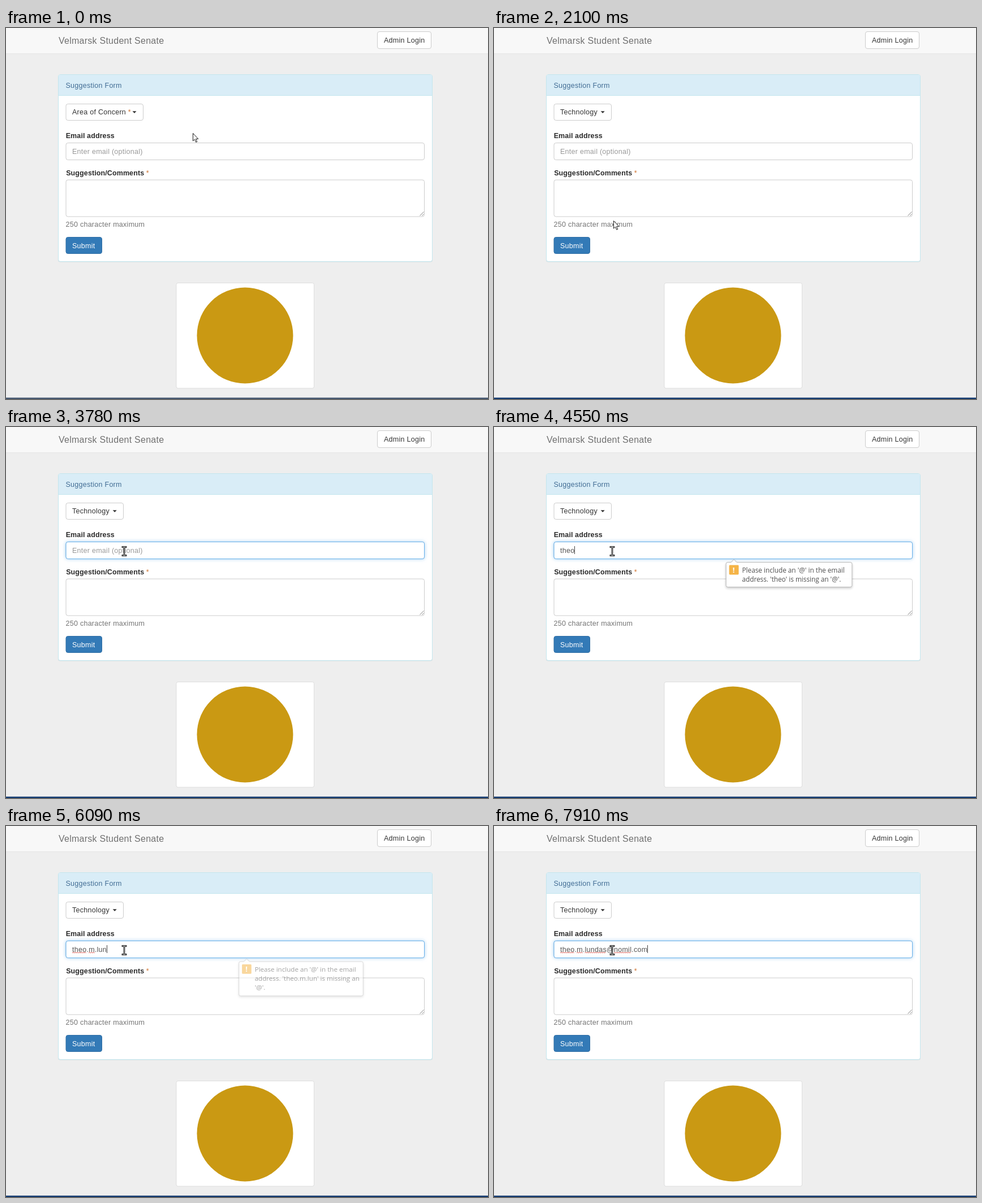
These frames come from a looping animation (852x657 px, 8000 ms). An HTML page:

```html
<!DOCTYPE html>
<html lang="en">
<head>
<meta charset="utf-8">
<title>Suggestion Form</title>
<style>
  html, body { margin: 0; width: 100%; height: 100%; overflow: hidden; background: #eee; }
  svg { display: block; width: 100vw; height: 100vh; }
  text { font: 12.5px "Liberation Sans", Arial, sans-serif; letter-spacing: .27px; fill: #333; }
  .brand { font-size: 16px; letter-spacing: .25px; fill: #707070; }
  .bold { font-weight: bold; letter-spacing: .1px; fill: #2b2b2b; }
  .head { fill: #416c94; }
  .hint { fill: #999; }
  .help { fill: #737373; }
  .typed { fill: #555; }
  .light { fill: #fff; }
  .star { fill: #d0732f; font-weight: normal; }
  .tip text { font: 11.85px "Open Sans", "Noto Sans", sans-serif; letter-spacing: 0; fill: #484848; }
  .tip .mark { font-weight: bold; font-size: 13px; fill: #fff; }
  .field { fill: #fff; stroke: #ccc; }
  #focus { filter: drop-shadow(0 0 3px rgba(102, 175, 233, .6)); }
  #menu .sheet { filter: drop-shadow(0 4px 4px rgba(0, 0, 0, .18)); }
  .tip .bubble { filter: drop-shadow(0 2px 2px rgba(0, 0, 0, .22)); }
</style>
</head>
<body>
<svg id="stage" viewBox="0 0 852 657" preserveAspectRatio="none"></svg>
<script>
const LOOP = 8000, STEP = 70;
const EMAIL = "theo.m.lundas@nomil.com";
const AREAS = ["Student & Academic Affairs", "Diversity", "Ethics", "Finance",
  "Health & Housing", "Public Relations", "Technology", "Other"];
const HOVER_AT = { x: 243, y: 164 }, OPEN = 980, PICK = 2100, FOCUS = 3290;

// Pointer: time, x, y
const PATH = [[0, 330, 186], [770, 216, 150], [1190, 216, 150], [1400, 211, 276],
  [1680, 211, 341], [2310, 211, 341], [2730, 208, 249], [3080, 209, 220]];

// Typing: time, characters shown
const KEYS = [[4130, 1], [4200, 3], [4270, 4], [5040, 5], [5530, 6], [5670, 7], [5740, 8],
  [5810, 9], [5880, 10], [6300, 11], [6370, 12], [6440, 13], [6580, 14], [6650, 15],
  [6790, 16], [6930, 18], [7420, 19], [7630, 20], [7770, 21], [7840, 22], [7910, 23]];

const esc = s => s.replace(/&/g, "&amp;");
const text = (x, y, s, cls = "") => `<text x="${x}" y="${y}" class="${cls}">${s}</text>`;
const box = (x, y, w, h, attrs = "", r = 3.5) =>
  `<rect x="${x}" y="${y}" width="${w}" height="${h}" rx="${r}" ${attrs}/>`;
const arrowDown = x => `<path d="M${x} 147.3h7l-3.5 3.7z" fill="#333"/>`;
const star = '<tspan class="star">*</tspan>';

function tip(id, h, lines) {
  const outline = `M412.5 239.5H418.5L423.5 234.5L428.5 239.5H630.5Q633.5 239.5 633.5 242.5` +
    `V${236.5 + h}q0 3 -3 3H412.5q-3 0 -3 -3V242.5Q409.5 239.5 412.5 239.5z`;
  return `<g id="${id}" class="tip"><path class="bubble" d="${outline}" fill="#fff" stroke="#b4b4b4"/>` +
    box(415, 244.5, 17, 17, 'fill="#f5b03e"', 1.5) + text(421.2, 257.6, "!", "mark") +
    lines.map((s, i) => text(438, 258 + 16.3 * i, s)).join("") + "</g>";
}

const stage = document.getElementById("stage");
stage.innerHTML =
  box(0, 0, 852, 657, 'fill="#eee"', 0) +
  box(0, 0, 852, 45, 'fill="#f8f8f8"', 0) + box(0, 45, 852, 1, 'fill="#e4e4e4"', 0) +
  text(93, 28, "Velmarsk Student Senate", "brand") +
  box(656.5, 6.5, 95, 30, 'class="field"') + text(668, 26, "Admin Login") +
  box(92, 83, 662, 331.5, 'fill="#d5dfe2"') +
  box(92.5, 82.5, 661, 331, 'fill="#fff" stroke="#c3e6ee"') +
  `<path d="M93 119V86q0-3 3-3H750q3 0 3 3V119z" fill="#d9edf7"/>` +
  box(93, 119, 660, 1, 'fill="#c3e6ee"', 0) +
  text(105.5, 105.5, "Suggestion Form", "head") +
  `<g id="before">${box(106, 134.5, 136.5, 29, 'id="button" class="field"')}` +
  `<text x="117" y="153">Area of Concern <tspan class="star" id="star">*</tspan></text>${arrowDown(223.5)}</g>` +
  `<g id="after">${box(106, 134.5, 101.5, 29, 'class="field"')}${text(117, 153, "Technology")}${arrowDown(188.7)}</g>` +
  text(105.7, 194.5, "Email address", "bold") +
  box(106, 203.5, 633.5, 30, 'class="field"') +
  box(106, 203.5, 633.5, 30, 'id="focus" fill="#fff" stroke="#66afe9"') +
  text(117, 223, "Enter email (optional)", "hint") +
  `<text id="typed" class="typed" x="117" y="223"></text>` +
  `<path id="wavy" fill="none" stroke="#d8443c" stroke-width=".9"/>` +
  `<rect id="caret" y="211" width="1" height="14" fill="#444"/>` +
  text(106.2, 260.5, "Suggestion/Comments " + star, "bold") +
  box(106, 269, 633.5, 65, 'class="field"') +
  `<path d="M731.5 332.5l7-7M735.5 332.5l3-3" stroke="#777" stroke-width=".9"/>` +
  text(105.5, 352, "250 character maximum", "help") +
  box(106, 370.5, 63.5, 29, 'fill="#337ab7" stroke="#2e6da4"') + text(117, 389.5, "Submit", "light") +
  box(301, 451.5, 243.5, 186.5, 'fill="#fff" stroke="#ddd"', 3) +
  `<circle cx="422.5" cy="544.5" r="85" fill="#ca9913"/>` +
  `<rect id="rule" y="654.6" width="852" height="2.4"/>` +
  `<g id="menu">${box(106.5, 183.5, 193, 192.5, 'class="sheet" fill="#fff" stroke="#c4c4c4"')}` +
  `<rect id="row" x="107" width="192" height="23" fill="#f4f4f4"/>` +
  AREAS.map((s, i) => text(124.7, 203.7 + 22.95 * i, esc(s))).join("") + "</g>" +
  tip("tipA", 44, ["Please include an '@' in the email", "address. 'theo' is missing an '@'."]) +
  tip("tipB", 62, ["Please include an '@' in the email", "address. 'theo.m.lun' is missing an", "'@'."]) +
  `<g id="pointer" stroke-linejoin="round">
    <path id="arrow" d="M.5 .5V14L3.5 11.2L5.7 16.2L7.8 15.3L5.6 10.4H9.8z" fill="#fff" stroke="#1c1c1c"/>
    <path id="hand" d="M-.6 11.5V1.2Q-.6 -.3 .8 -.3T2.2 1.2V6.2Q2.4 5.2 3.5 5.3T4.7 6.6Q5 5.8 6 6T7 7.3Q7.4 6.7 8.2 7T8.9 8.4V12Q8.9 14 7.4 15.5V17.6H.2V15.8L-3.4 10.6Q-4 9.3 -3 8.8T-.6 10.4M2.2 6V9.4M4.7 6.6V9.4M7 7.2V9.6" fill="#fff" stroke="#1c1c1c"/>
    <g id="beam" fill="none" stroke-linecap="square">
      <path d="M-3 -7.5H-1Q0 -7.5 0 -6.5Q0 -7.5 1 -7.5H3M-3 7.5H-1Q0 7.5 0 6.5Q0 7.5 1 7.5H3M0 -6V6" stroke="#1c1c1c" stroke-width="2.8"/>
      <path d="M-3 -7.5H3M-3 7.5H3M0 -7V7" stroke="#fff" stroke-width=".7"/>
    </g>
  </g>`;

const el = {};
stage.querySelectorAll("[id]").forEach(n => el[n.id] = n);
const show = (name, on) => el[name].setAttribute("display", on ? "inline" : "none");
const set = (name, key, value) => el[name].setAttribute(key, value);
const clamp = v => Math.min(1, Math.max(0, v));
const hint = stage.querySelector(".hint");

function pointerAt(t) {
  const i = PATH.findIndex(p => p[0] > t);
  if (i < 0) return PATH[PATH.length - 1].slice(1);
  const [t0, x0, y0] = PATH[i - 1], [t1, x1, y1] = PATH[i];
  let p = (t - t0) / (t1 - t0);
  if (i === 1) p = p * p * (3 - 2 * p);
  return [x0 + (x1 - x0) * p, y0 + (y1 - y0) * p];
}

function drawTip(name, h, from, to, t) {
  const p = t < to ? clamp((t - from) / 200) : clamp(1 - (t - to + 30) / 240);
  const k = .96 + .04 * p, cx = 521.5, cy = 239 + h / 2;
  show(name, p > 0);
  set(name, "opacity", p < .8 ? p : Math.min(1, p + .1));
  set(name, "transform", `translate(${cx} ${cy}) scale(${k}) translate(${-cx} ${-cy})`);
}

function drawEmail(t) {
  const [last, count] = KEYS.filter(k => k[0] <= t).pop() || [FOCUS, 0];
  const shown = EMAIL.slice(0, count);
  if (el.typed.textContent !== shown) el.typed.textContent = shown;
  hint.setAttribute("display", count ? "none" : "inline");
  const at = n => 117 + (n ? el.typed.getSubStringLength(0, n) : 0);

  // Finished words get the spelling mark
  let wave = "";
  for (const m of shown.matchAll(/\w+(?=[.@])/g)) {
    const end = at(m.index + m[0].length);
    let x = at(m.index), up = false;
    wave += `M${x} 224.8`;
    while ((x += 1.75) < end) wave += `L${x} ${(up = !up) ? 223.6 : 224.8}`;
  }
  set("wavy", "d", wave);
  set("caret", "x", Math.round(at(count)));
  show("caret", t >= FOCUS && (t - last) % 980 < 490);
}

function draw(time) {
  const t = Math.min(Math.floor(time / STEP) * STEP, 7910);
  const [x, y] = pointerAt(t);
  const open = t >= OPEN && t < PICK;
  const over = t < PICK && (open || (x < HOVER_AT.x && y < HOVER_AT.y));

  show("before", t < PICK);
  show("after", t >= PICK);
  el.button.style.fill = over ? "#e6e6e6" : "#fff";
  el.button.style.stroke = over ? "#adadad" : "#ccc";
  el.star.style.fill = over ? "#333" : "";
  set("rule", "fill", t < OPEN ? "#44566f" : "#12396f");

  show("menu", open);
  const row = Math.floor((y - 188) / 23);
  show("row", row >= 0 && row < AREAS.length);
  set("row", "y", 188 + 23 * row - .5);

  const inField = t >= PICK && ((y > 269 && y < 334) || y < 233);
  show("hand", over);
  show("beam", inField);
  show("arrow", !over && !inField);
  set("pointer", "transform", `translate(${x} ${y})`);

  set("focus", "opacity", clamp((t - FOCUS + STEP) / (3 * STEP)));
  drawEmail(t);
  drawTip("tipA", 44, 4380, 5040, t);
  drawTip("tipB", 62, 5990, 6300, t);
}

const start = performance.now();
function tick() {
  draw((performance.now() - start) % LOOP);
  requestAnimationFrame(tick);
}
tick();
</script>
</body>
</html>
```
